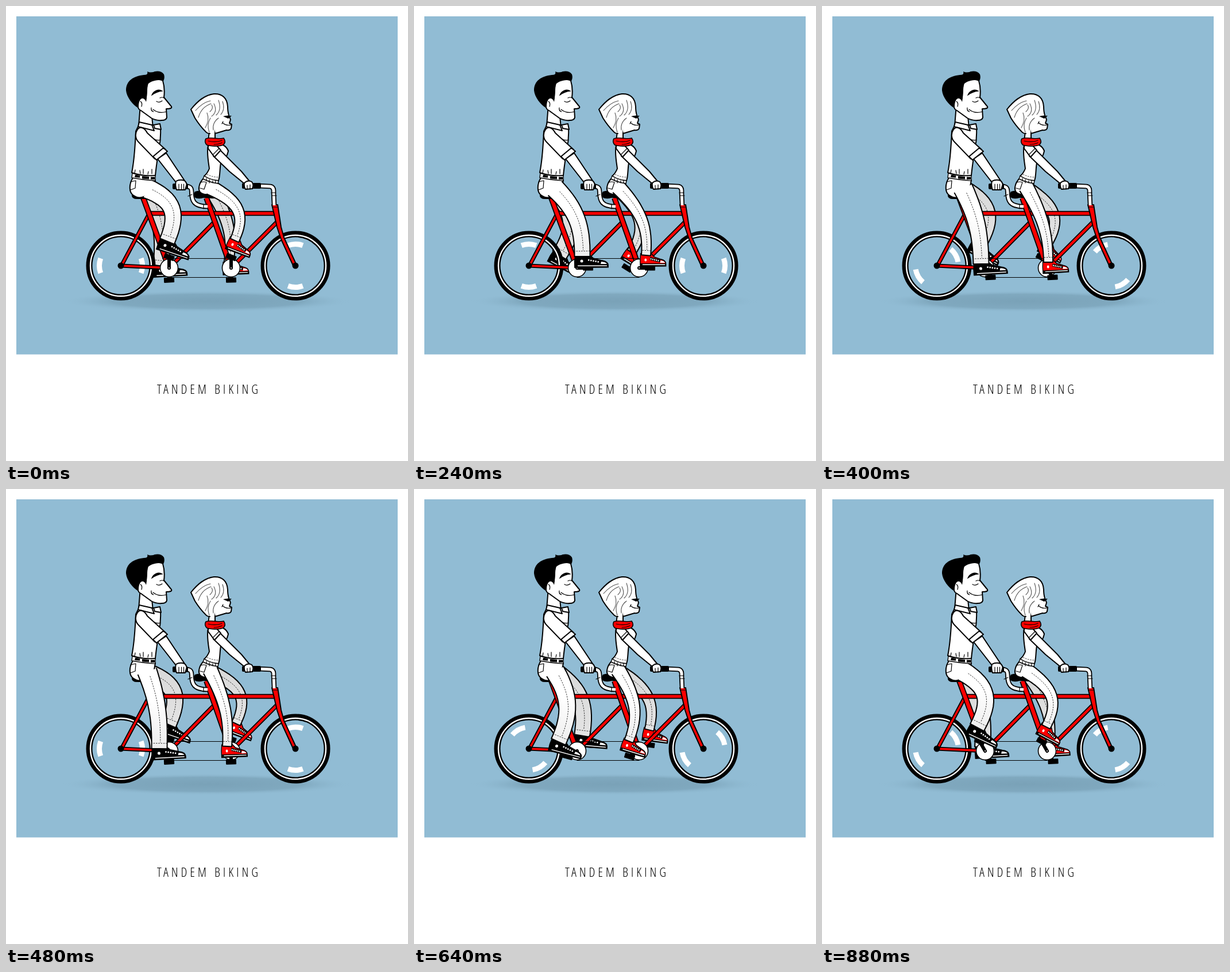
Write an HTML page that moves like this. It is 700 px wide and 792 px high and loops after 920 ms.

```html
<!DOCTYPE html>
<html lang="en">
<head>
<meta charset="utf-8">
<title>Tandem Biking</title>
<style>
  html, body { margin: 0; width: 100%; height: 100%; overflow: hidden; background: #fff; }
  svg { display: block; width: 100vw; height: 100vh; }
  .ink { fill: #fff; stroke: #000; stroke-width: 2; stroke-linejoin: round; stroke-linecap: round; }
  .line { fill: none; stroke: #000; stroke-width: 1.2; stroke-linecap: round; stroke-linejoin: round; }
  .hair { fill: none; stroke: #555; stroke-width: 1.1; stroke-linecap: round; }
  .stitch { fill: none; stroke: #333; stroke-width: 1; stroke-dasharray: 2.5 1.8; }
  #caption { font-size: 22.4px; font-weight: 300; font-stretch: 75%; }
</style>
</head>
<body>
<svg viewBox="0 0 700 792" xmlns="http://www.w3.org/2000/svg">
  <defs>
    <radialGradient id="shade">
      <stop offset="0" stop-color="#7299ae" stop-opacity=".75"/>
      <stop offset=".65" stop-color="#7299ae" stop-opacity=".55"/>
      <stop offset="1" stop-color="#91bcd4" stop-opacity="0"/>
    </radialGradient>
    <linearGradient id="denim" x1="0" y1="0" x2="0" y2="1">
      <stop offset=".4" stop-color="#fff"/><stop offset="1" stop-color="#ededed"/>
    </linearGradient>
    <linearGradient id="denimFar" x1="0" y1="0" x2="0" y2="1">
      <stop offset="0" stop-color="#d8d8d8"/><stop offset="1" stop-color="#e4e4e4"/>
    </linearGradient>
  </defs>

  <rect width="700" height="792" fill="#fff"/>
  <rect x="18" y="18" width="664" height="588.5" fill="#91bcd4"/>
  <ellipse cx="350" cy="514" rx="254" ry="19" fill="url(#shade)"/>

  <g id="farLegs"></g>
  <g id="wheels"></g>
  <g id="frame"></g>

  <!-- saddles -->
  <path d="M219 328 Q218 336 228 336 L244 336 Q256 337 264 335 Q264 331 256 330 L240 325Z"/>
  <path d="M329 323 Q326 327 328 333 Q334 337 344 334 L360 335 Q372 335 372 332 L350 323 Q336 320 329 323Z"/>
  <g id="bars"></g>

  <path class="line" d="M284 439.5H392M284 472.5H392"/>
  <g id="nearLegs"></g>

  <!-- rear rider -->
  <g>
    <path class="ink" d="M234 172 L231 209 L256 212 L254 192Z"/>
    <path class="ink" d="M231 208 L226 218 C225 240 224 266 219 290 Q238 297 260 295 C261 284 263 270 266 250 Q270 232 269 213 L258 207Z"/>
    <path class="line" d="M225 285l-1 6M233 286l1 6M239 284l0 8M248 288l-1 5M254 284l0 8M257 231Q263 235 269 233M257 231L258 239"/>
    <path class="ink" d="M232 202 L254 207 L258 217 L230 210Z M257 207 L268 205 L270 215 L259 213Z"/>
    <path class="ink" style="stroke-width:1.4" d="M220 291 Q240 297 260 295 L260 304 Q240 303 219 299Z"/>
    <path d="M225 293.500l8 1.500v4l-9-1zM237 296l12 1v4.500l-12-1zM252 297.500h7v4.500h-7z"/>
    <path class="line" d="M217 306 L226 304 L225 317 L217 320"/>
    <path class="ink" d="M264 266 L296 307 L311 304 L279 256Z"/>
    <path class="ink" d="M229 215 C224 222 225 231 231 237 L259 266 L278 250 L246 221 C241 211 233 209 229 215Z"/>
    <path class="ink" d="M256 262 L274 247 L281 253 L262 268Z"/>
    <path class="ink" d="M296 305 Q303 301 311 304 Q316 309 314 313 L312 320 L297 320 Q294 312 296 305Z"/>
    <path class="line" d="M301 310v10M305.500 310v10M309.500 310v10"/>

    <path class="ink" d="M247 132 C256 126 268 126 273 130 C276 140 276 152 275 159 L288 175 Q290 179 279 179 L280 194 Q279 199 271 199 Q262 200 253 195 L235 182 C229 180 228 170 230 165 C233 158 240 156 243 163 C246 150 244 140 247 132Z"/>
    <path d="M231 178 C220 172 210 158 209 147 C209 130 222 122 240 120 Q248 120 246 114 Q252 117 259 114 Q270 112 275 119 Q277 125 274 131 C268 127 256 129 248 135 C244 144 247 151 244 167 C240 156 230 159 231 178Z"/>
    <path d="M254 155 C257 147 266 144 272 148 Q263 149 254 155Z" stroke="#000" stroke-width="1.2"/>
    <path class="line" d="M262 166 Q267 169 272 165 M268 160 Q272 158 275 160 M253 177 Q252 183 257 184 M256 180 Q266 188 279 184 M234 166 Q238 168 236 175"/>
  </g>

  <!-- front rider -->
  <g>
    <path class="ink" d="M354 218 L352 236 L364 236 L364 218Z"/>
    <path class="ink" d="M352 242 C349 256 353 274 354 283 Q351 291 345 296 Q357 304 370 304 C373 296 372 284 374 273 C381 269 386 259 387 252 Q384 245 378 242Z"/>
    <path class="ink" style="stroke-width:1.4" d="M345 296 Q357 303 370 304 L369 309 Q355 307 343 301Z"/>
    <path class="line" d="M349 300v4M354 302v6M360 304v4M365 304v4M339 307 Q345 305 349 307 L345 319 L338 317"/>
    <path class="stitch" d="M350 293 Q360 298 370 298"/>
    <path class="ink" d="M361 261 L389 288 L416 310 L424 305 L410 288 L372 250Z"/>
    <path class="ink" d="M352 248 C351 238 360 236 366 242 L374 251 L363 263Z"/>
    <path class="line" d="M360 259 L371 248"/>
    <path class="ink" d="M415 308 Q421 302 428 306 Q432 311 429 318 L417 319 Q414 314 415 308Z"/>
    <path class="line" d="M420 312v7M425 311v8"/>
    <path d="M348 231 C358 227 370 233 379 230 Q384 237 378 242 C370 245 356 244 350 242 C346 239 346 234 348 231Z" fill="#f00" stroke="#000" stroke-width="1.6"/>
    <path class="line" d="M352 235 Q366 238 376 234 M362 241 Q370 241 376 238"/>

    <path class="ink" d="M364 222 L360 206 L376 190 L389 192 L391 198 L389 204 L393 206 L392 213 Q390 217 384 216Z"/>
    <path class="line" d="M377 203 Q383 209 392 207 M378 201l-2 4"/>
    <path fill="#fff" d="M322 180 C334 165 346 155 362 153 C376 152 385 160 386 175 Q386 184 388 190 C377 193 369 199 364 211 L363 221 Q354 225 348 220 C341 212 334 203 329 195Z"/>
    <path class="ink" style="fill:none" d="M355 222 Q350 222 347 218 C340 211 334 203 329 195 L322 180 C334 165 346 155 362 153 C376 152 385 160 386 175 Q386 184 388 190"/>
    <path class="hair" d="M330 182 Q342 168 356 165 M335 194 Q340 176 357 170 M347 212 Q355 198 350 186 M354 220 Q349 206 356 195 M361 216 Q359 203 370 195 M358 192 Q369 184 362 170 M366 190 Q376 181 370 164 M374 189 Q382 180 377 166 M355 184 Q362 178 358 172"/>
    <path d="M378 192 Q385 190 393 191 L387 196Z"/>
  </g>

  <text id="caption" x="263" y="675">TANDEM BIKING</text>
</svg>

<script>
const $ = id => document.getElementById(id);
const RED = "#f00";
const rad = deg => deg * Math.PI / 180;
const xy = p => p[0].toFixed(1) + " " + p[1].toFixed(1);
const stroke = (d, w, color, cap = "butt") =>
  `<path d="${d}" fill="none" stroke="${color}" stroke-width="${w}" stroke-linecap="${cap}" stroke-linejoin="round"/>`;

// Ankle x, y and shoe tilt for every 30 degrees of the crank
const stride = [
  [280.5, 409.5, 19], [288, 415, 15], [290, 429, 5], [293, 436, 0],
  [286, 442.5, -1], [277, 449, -3], [267, 452, -3], [259.5, 449.5, 1],
  [251.5, 440, 15], [250.5, 433, 28], [256, 421, 33], [270, 415, 25]
];
const strideFront = [
  [398, 408, 21], [402, 413, 17], [407, 419, 8], [404, 434, 0],
  [402, 441, -2], [394, 446, -3], [385, 448, -2], [381, 447, 2],
  [374, 439, 17], [376, 428, 32], [381, 420, 35], [390, 414, 28]
];

const riders = [
  { hip: [246, 318], crank: [284, 456], thigh: 67, shin: 71, wide: [17, 14, 13.5],
    stride, shoe: "#000", size: 1,
    seat: "M221 299 C214 310 214 324 221 329 Q230 336 240 332 L257 320 L260 303" },
  { hip: [356, 316], crank: [392, 456], thigh: 76, shin: 64, wide: [13, 9, 8],
    stride: strideFront, shoe: RED, size: .77,
    seat: "M344 300 C336 308 334 319 338 324 Q345 330 353 327 L366 318 L369 307" }
];

function pose(keys, deg) {
  const n = keys.length, u = ((deg % 360) + 360) % 360 / 30, i = Math.floor(u), t = u - i;
  const at = k => keys[(i + k + n) % n];
  return at(0).map((b, j) => {
    const a = at(-1)[j], c = at(1)[j], d = at(2)[j];
    return b + t / 2 * (c - a + t * (2 * a - 5 * b + 4 * c - d + t * (3 * (b - c) + d - a)));
  });
}

function kneeOf(hip, foot, a, b) {
  const dx = foot[0] - hip[0], dy = foot[1] - hip[1];
  const d = Math.min(Math.hypot(dx, dy), a + b - .5);
  const phi = Math.atan2(dx, dy) + Math.acos((a * a + d * d - b * b) / (2 * a * d));
  return [hip[0] + a * Math.sin(phi), hip[1] + a * Math.cos(phi)];
}

function trousers(r, hip, foot, fill) {
  const knee = kneeOf(hip, foot, r.thigh, r.shin);
  const quad = (a, b, c, t) => (1 - t) * (1 - t) * a + 2 * t * (1 - t) * b + t * t * c;
  const pull = (end, k) => end[k] + .75 * (knee[k] - end[k]);
  const axis = [0, 1].map(k => [hip[k], pull(hip, k), pull(foot, k), foot[k]]);
  const point = (t, side) => {
    const [[x, tx], [y, ty]] = axis.map(([a, b, c, d]) => [
      (1 - t) * quad(a, b, c, t) + t * quad(b, c, d, t),
      quad(b - a, c - b, d - c, t)
    ]);
    const w = side * quad(...r.wide, t) / Math.hypot(tx, ty);
    return [x + ty * w, y - tx * w];
  };
  const run = (side, from, to) =>
    Array.from({ length: 17 }, (_, i) => xy(point(from + (to - from) * i / 16, side))).join("L");
  return `<path class="ink" style="fill:url(#${fill})" d="M${run(1, 0, 1)}L${run(-1, 1, 0)}"/>
    <path class="stitch" d="M${run(.12, .06, .93)}M${xy(point(.94, 1))}L${xy(point(.94, -1))}"/>`;
}

function shoe(r, [x, y, tilt]) {
  return `<g transform="translate(${x} ${y}) rotate(${tilt}) scale(${r.size} 1)">
    <path d="M-12 -3 L12 -3 L19 3 L34 7 Q45 9 45 15 L45 18.500 L-13 19 Q-14 8 -12 -3Z" fill="${r.shoe}" stroke="#000" stroke-width="1.800"/>
    <path d="M-13 14 L45 14 L45 18.500 L-13 19Z"/>
    ${stroke("M9 5.500L32 10", 5, "#000")}
    <path d="M33 9 Q41 9.500 43 13 L32 13Z" fill="#fff"/>
    ${stroke("M-8 16.300H43", 1.4, "#fff")}
    <path d="M10 6 L30 9.800" stroke="#fff" stroke-width="2.500" stroke-dasharray="2.400 1.800"/>
    <circle cx="-1" cy="8" r="2.500" fill="#fff"/></g>`;
}

function pedal([cx, cy], deg, reach, tilt) {
  const a = rad(deg), x = cx + reach * Math.sin(a), y = cy - reach * Math.cos(a);
  return stroke(`M${cx} ${cy}L${xy([x, y])}`, 6, "#000", "round") +
    `<rect x="-9" y="-4.500" width="18" height="9" rx="1" transform="translate(${x} ${y}) rotate(${tilt})"/>`;
}

function farLeg(r, deg) {
  const [x, y, tilt] = pose(r.stride, deg);
  const foot = [x + 2.5, y + .5, tilt];
  return pedal(r.crank, deg, 21, tilt) + shoe(r, foot) +
    trousers(r, [r.hip[0] + 2.5, r.hip[1] + 4], foot, "denimFar");
}

function nearLeg(r, deg) {
  const foot = pose(r.stride, deg), [cx, cy] = r.crank;
  return `<circle class="ink" cx="${cx}" cy="${cy}" r="15.500" style="stroke-width:1.600"/>` +
    pedal(r.crank, deg, 19, foot[2]) + stroke(`M${cx} ${cy}v.1`, 2, "#fff", "round") +
    shoe(r, foot) + `<path class="ink" d="${r.seat}"/>` + trousers(r, r.hip, foot, "denim");
}

function wheel(cx, id) {
  const ring = (r, w, c) => `<circle r="${r}" fill="none" stroke="${c}" stroke-width="${w}"/>`;
  const c = 37.5 * Math.cos(rad(20)), s = 37.5 * Math.sin(rad(20));
  const mark = k => `M${k * c} ${-k * s}A37.5 37.5 0 0 1 ${k * c} ${k * s}`;
  return `<g transform="translate(${cx} 452)">${ring(55, 11, "#000")}${ring(53, 2.4, "#fff")}
    <g id="${id}">${stroke(mark(1) + mark(-1), 9, "#fff")}</g></g>`;
}

const tube = (d, w) => stroke(d, w, "#000") + stroke(d, w - 3.6, RED);
const pipe = (d, w) => stroke(d, w, "#000") + stroke(d, w - 3.6, "#fff");

$("wheels").innerHTML = wheel(200, "rearMarks") + wheel(504, "frontMarks");
$("frame").innerHTML =
  tube("M200 452L284 456", 7) + tube("M249 362L201 452", 7) +
  tube("M288 452L365 374", 8) + tube("M396 452L474 374", 8) +
  tube("M247 361H472", 8.6) +
  tube("M239 334L284 456", 10) + tube("M349 334L392 456", 10) +
  `<path d="M463 346 L473 346 L479 385 L484 403 L506 451 L501 454 L479 406 L472 385Z" fill="${RED}" stroke="#000" stroke-width="2" stroke-linejoin="round"/>
   <path class="line" d="M464 350H474"/>
   <circle cx="200" cy="452" r="5.500"/><circle cx="504" cy="452" r="5.500"/>`;
$("bars").innerHTML =
  pipe("M314 314C330 314 318 330 328 342Q334 349 351 349", 8.5) +
  pipe("M440 313L460 314Q467 315 466 325L467 347", 8.5) +
  `<path class="line" d="M317 331l7-3M344 345v8M462 325h8M463 330h8"/>
   <rect x="290" y="309" width="27" height="10" rx="2"/><rect x="411" y="308" width="33" height="10" rx="2"/>`;

// Set the caption in the narrowest light face at hand, then track it to span the line
const caption = $("caption");
const widthIn = face => {
  caption.style.fontFamily = `"${face}", sans-serif`;
  return caption.getComputedTextLength();
};
const faces = ["Open Sans", "Noto Sans", "Roboto", "Lato"].map(face => [widthIn(face), face]);
const natural = widthIn(faces.sort((a, b) => a[0] - b[0])[0][1]);
caption.style.letterSpacing = ((176 - natural) / (caption.textContent.length - 1)).toFixed(2) + "px";

let shown = -1;
function draw(now) {
  const step = Math.floor(now % 920 / 40);
  if (step !== shown) {
    shown = step;
    const deg = step * 15;
    $("farLegs").innerHTML = riders.map(r => farLeg(r, deg + 180)).join("");
    $("nearLegs").innerHTML = riders.map(r => nearLeg(r, deg)).join("");
    $("rearMarks").setAttribute("transform", `rotate(${deg})`);
    $("frontMarks").setAttribute("transform", `rotate(${deg + 90})`);
  }
  requestAnimationFrame(draw);
}
draw(performance.now());
</script>
</body>
</html>
```
